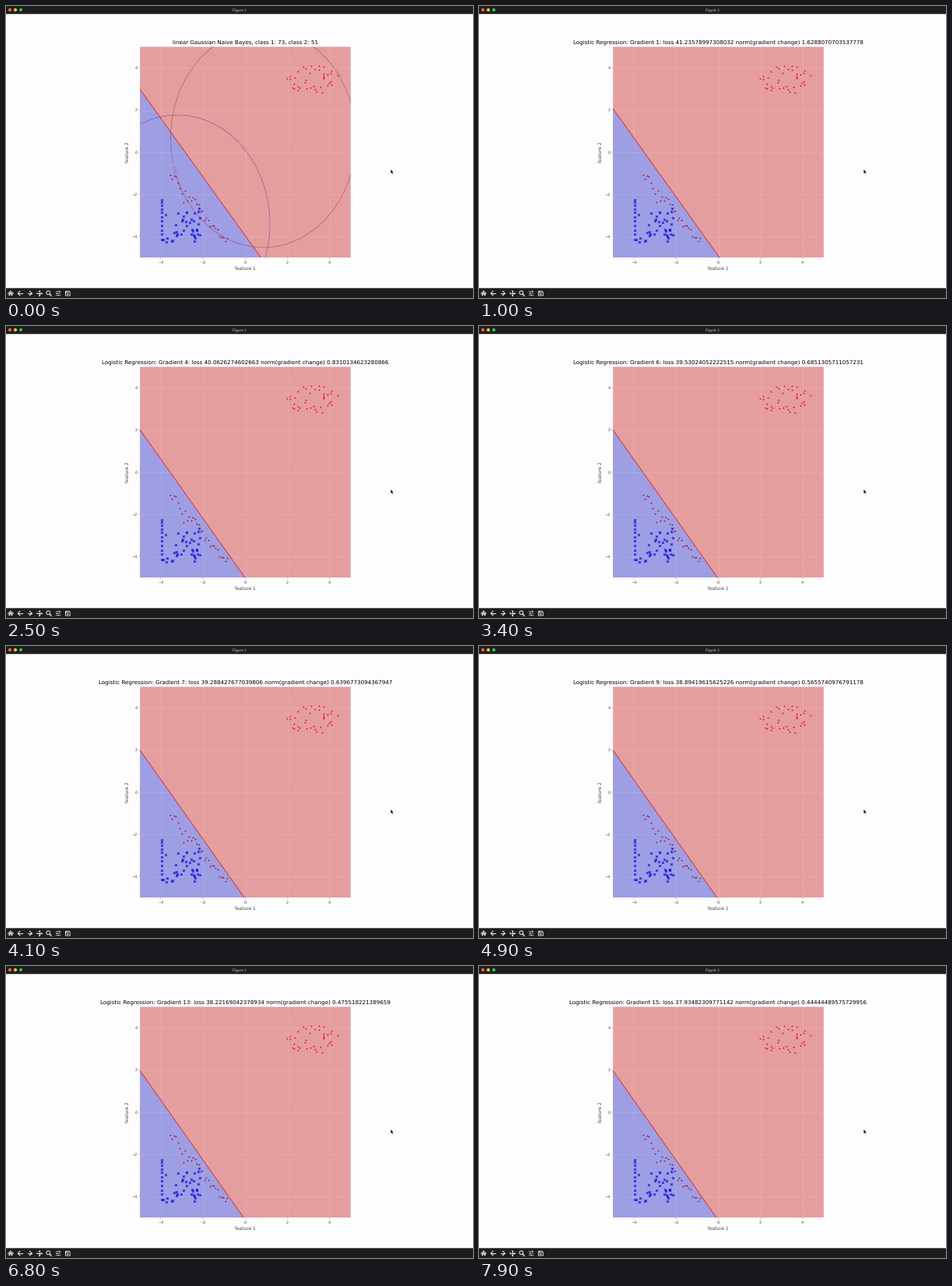
These frames come from a looping animation (600 px wide and 375 px high, 8000 ms). A matplotlib script:

```python
import numpy as np
import matplotlib.pyplot as plt
from matplotlib.animation import FuncAnimation
from matplotlib.patches import Circle, Polygon, Rectangle

W, H, DPI = 600, 375, 100
FRAMES, INTERVAL = 80, 100
PT = 72 / DPI
LEFT, RIGHT, TOP, BOTTOM = 172.2, 442.8, 52.4, 323.0
MID_X, MID_Y, UNIT = 307.5, 187.7, 27.06
LAST_STEP = 15

plt.rcParams["font.family"] = "DejaVu Sans"
plt.rcParams["text.hinting"] = "none"

RED_FILL, BLUE_FILL = "#e59e9e", "#9e9ee4"
BAR, ICON, LABEL = "#1e1e1f", "#e8e8e8", "#444444"

# Loss and gradient norm at key steps; the steps between are interpolated
KEY_STEPS = np.array([1, 4, 6, 9, 13, 15])
KEY_LOSS = [41.23578997308032, 40.0626274602663, 39.53024052222515,
            38.89419615625226, 38.22169042378934, 37.93482309771142]
KEY_NORM = [1.6288070703537778, 0.8310134623280866, 0.6851305711057231,
            0.5655740976791178, 0.475518221389659, 0.44444489575729956]

rng = np.random.default_rng(4)
fig = plt.figure(figsize=(W / DPI, H / DPI), dpi=DPI, facecolor="#fdfdfd")
ax = fig.add_axes([0, 0, 1, 1])
ax.set_xlim(0, W)
ax.set_ylim(H, 0)
ax.axis("off")


def rect(x, y, w, h, color, z=1, edge="none", lw=0):
    return ax.add_patch(Rectangle((x, y), w, h, fc=color, ec=edge, lw=lw * PT,
                                  zorder=z, snap=False))


def poly(points, color, z=1, edge="none", lw=0):
    return ax.add_patch(Polygon(points, fc=color, ec=edge, lw=lw * PT, zorder=z))


def circle(x, y, r, color, edge="none", lw=0, z=2):
    ax.add_patch(Circle((x, y), r, fc=color, ec=edge, lw=lw * PT, zorder=z))


def line(xs, ys, color, width, z=2, **kw):
    return ax.plot(xs, ys, color=color, lw=width * PT, zorder=z, **kw)[0]


def text(x, y, s, size, color="black", ha="center", va="baseline", **kw):
    return ax.text(x, y, s, fontsize=size * PT, color=color, ha=ha, va=va, **kw)


def marks(xs, ys, marker, size, color, edge=0):
    ax.plot(xs, ys, ls="none", marker=marker, ms=size * PT, color=color,
            mew=edge * PT, zorder=6)


def draw_points():
    # Far cluster: uniform in an ellipse
    r, a = np.sqrt(rng.random(40)), rng.uniform(0, 2 * np.pi, 40)
    marks(394 + 34 * r * np.cos(a), 94 + 18 * r * np.sin(a), "o", 1.8, "#f00000")

    # Near cluster: a slanted band
    t = np.linspace(0, 1, 31)
    marks(211 + 73 * t, 221 + 80 * t + rng.normal(0, 5, t.size),
          "o", 1.7, "#a0000c")

    # Crosses: a square patch plus a column on its left edge
    x = rng.uniform(202, 250, 40)
    low = 268 - 0.2 * (x - 202)
    y = low + (303 - low) * rng.random(40)
    marks(x, y, "x", 2.8, "#0000e8", 0.8)
    marks(np.full(11, 199.7), 248.5 + 51 * np.linspace(0, 1, 11) ** 1.2,
          "x", 2.8, "#0000e8", 0.8)


def draw_plot():
    for v in range(-4, 5, 2):
        x, y = MID_X + v * UNIT, MID_Y - v * UNIT
        name = str(v).replace("-", "\u2212")
        line([x, x], [TOP, BOTTOM], "white", 0.7, 3, alpha=0.15)
        line([LEFT, RIGHT], [y, y], "white", 0.7, 3, alpha=0.15)
        line([x, x], [BOTTOM, BOTTOM + 1.7], "#555555", 0.4)
        line([LEFT - 1.7, LEFT], [y, y], "#555555", 0.4)
        text(x, BOTTOM + 8, name, 4.95, LABEL)
        text(LEFT - 3.6, y + 1.9, name, 4.95, LABEL, ha="right")
    text(MID_X, 338.6, "feature 1", 5.94, LABEL)
    text(156, MID_Y, "feature 2", 5.94, LABEL, va="center", rotation=90)
    draw_points()


def draw_contour(cx, cy, color, labels):
    """Density contour with gaps for its level labels; returns its artists."""
    rx, ry = 119, 140
    t = np.radians(np.linspace(-180, 180, 721))
    x, y = cx + rx * np.cos(t), cy + ry * np.sin(t)
    parts = []
    for a in np.radians(labels):
        px, py = cx + rx * np.cos(a), cy + ry * np.sin(a)
        x[np.hypot(x - px, y - py) < 7.5] = np.nan
        slope = np.degrees(np.arctan(ry * np.cos(a) / (rx * np.sin(a))))
        parts.append(text(px, py, "0.005", 4.6, color, va="center_baseline",
                          rotation=slope, rotation_mode="anchor",
                          alpha=0.5, zorder=5))
    curve = line(x, y, color, 0.65, 5, alpha=0.65)
    curve.set_clip_path(frame)
    return parts + [curve]


def draw_title_bar():
    rect(0, 0, W, 10.3, BAR)
    for i, color in enumerate(("#ff5f57", "#febc2e", "#28c840")):
        circle(5 + 7 * i, 5, 2.1, color)
    text(300, 6.8, "Figure 1", 4.9, "#c4c4c4", family="Liberation Sans")


def arrow_icon(x, y, d):
    line([x - 3 * d, x + 2 * d], [y, y], ICON, 1.1)
    line([x, x + 2.8 * d, x], [y - 2.8, y, y + 2.8], ICON, 1.1)


def draw_toolbar():
    y = 369
    rect(0, 362.3, W, 13, BAR)
    line([2.7, 6, 9.3], [y + .2, y - 3, y + .2], ICON, 1)
    poly([(3.6, y + .6), (6, y - 1.7), (8.4, y + .6), (8.4, y + 3),
          (6.7, y + 3), (6.7, y + 1.2), (5.3, y + 1.2), (5.3, y + 3),
          (3.6, y + 3)], ICON, 2)
    arrow_icon(18, y, -1)
    arrow_icon(30.5, y, 1)
    line([39.7, 46.3], [y, y], ICON, 1)
    line([43, 43], [y - 3.3, y + 3.3], ICON, 1)
    for dx, dy in ((1, 0), (-1, 0), (0, 1), (0, -1)):
        bx, by = 43 + 2.4 * dx, y + 2.4 * dy
        poly([(43 + 4 * dx, y + 4 * dy), (bx + 1.5 * dy, by + 1.5 * dx),
              (bx - 1.5 * dy, by - 1.5 * dx)], ICON, 2)
    circle(54.3, y - .8, 2.4, "none", ICON, 1)
    line([56, 58.3], [y + 1, y + 3.3], ICON, 1.3)
    for dy, knob in ((-2.5, 1.3), (0, -1.3), (2.5, .3)):
        rect(63.8, y + dy - .3, 6.6, .6, ICON, 2)
        rect(66.5 + knob, y + dy - .9, 1.1, 1.8, ICON, 2)
    poly([(76.4, y - 2.8), (81, y - 2.8), (82.3, y - 1.5), (82.3, y + 2.9),
          (76.4, y + 2.9)], "none", 2, ICON, 0.9)
    rect(77.2, y - 2, 3.2, 1.4, "none", 3, ICON, 0.6)
    circle(79.3, y + 1.2, 0.9, ICON, z=3)


def draw_cursor():
    poly([(494.2, 209.6), (494.2, 215.3), (495.5, 214.2), (496.4, 216.2),
          (497.3, 215.8), (496.4, 213.9), (498.1, 213.8)],
         "black", 8, "white", 0.3)


frame = rect(LEFT, TOP, RIGHT - LEFT, BOTTOM - TOP, RED_FILL)
region = poly([(LEFT, 107), (327.5, BOTTOM), (LEFT, BOTTOM)], BLUE_FILL, 2)
border = line([LEFT, 327.5], [107, BOTTOM], "#dc2018", 0.8, 4)
border.set_clip_path(frame)
draw_plot()
contours = (draw_contour(330.5, 170, "#8a3040", (163, -36.5))
            + draw_contour(220, 280, "#40388c", (-44.5,)))
title = text(MID_X, 48.5, "", 7.125)
draw_title_bar()
draw_toolbar()
draw_cursor()


def step_at(i):
    """Training starts after one second, seven steps every 3.4 seconds."""
    return sum(i >= round(10 + 34 / 7 * k) for k in range(LAST_STEP))


def update(i):
    step = step_at(i)
    if step:
        loss, norm = (float(np.interp(np.log(step), np.log(KEY_STEPS), values))
                      for values in (KEY_LOSS, KEY_NORM))
        title.set_text(f"Logistic Regression: Gradient {step}: loss {loss} "
                       f"norm(gradient change) {norm}")
        progress = np.log(step) / np.log(LAST_STEP)
        y0, x1 = 132 + 2.5 * progress, 309 - 4 * progress
    else:
        title.set_text("linear Gaussian Naive Bayes, class 1: 73, class 2: 51")
        y0, x1 = 107, 327.5
    region.set_xy([(LEFT, y0), (x1, BOTTOM), (LEFT, BOTTOM)])
    border.set_data([LEFT, x1], [y0, BOTTOM])
    for part in contours:
        part.set_visible(step == 0)
    return [title, region, border, *contours]


anim = FuncAnimation(fig, update, frames=FRAMES, interval=INTERVAL,
                     repeat=True, repeat_delay=0)
plt.show()
```
